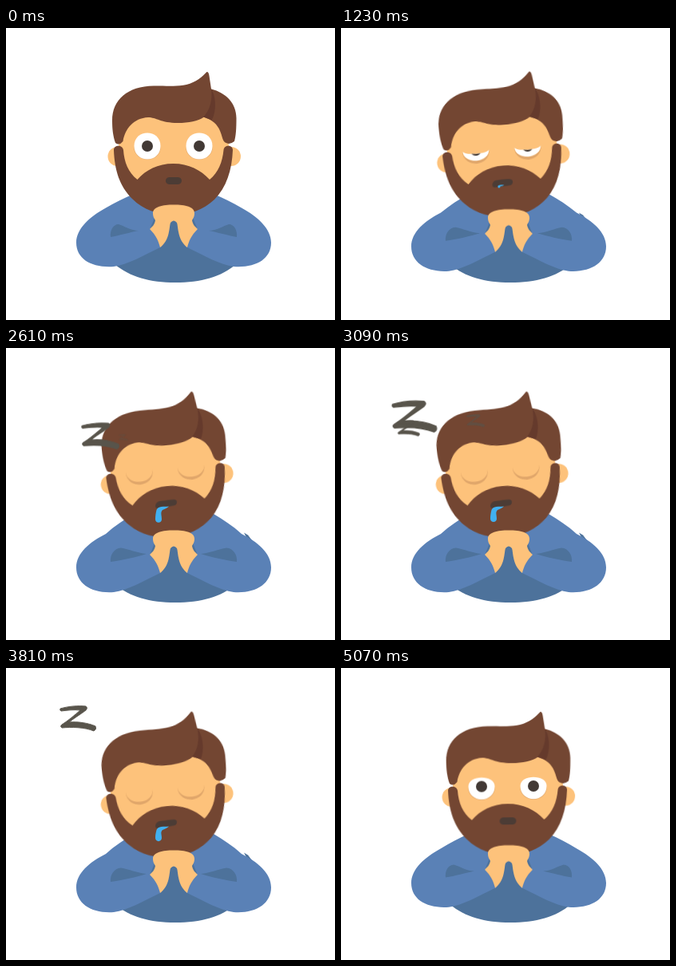
These frames come from a looping animation (412x366 px, 5.1 s). An HTML page:

```html
<!DOCTYPE html>
<html lang="en">
<head>
<meta charset="utf-8">
<title>Dozing off</title>
<style>
  html, body { margin: 0; width: 100%; height: 100%; overflow: hidden; background: #fff; }
  svg { display: block; width: 412px; height: 366px; }

  .skin { fill: #fdc27b; }
  .lash { fill: #e0a66a; }
  .hair { fill: #734632; }
  .lock { fill: #653a2c; }
  .sleeve { fill: #5a81b6; }
  .shirt { fill: #4d729b; }
  .pupil { fill: #423935; }
  .mouth { fill: #4c3c35; }
  .drool { fill: #41b0f0; }
  .z { fill: #58544b; stroke: #58544b; opacity: 0; }

  .move, .morph, .lid, .drool, .z { animation: 5.1s linear infinite; }
  .move { animation-name: move; }
  .morph { animation-name: morph; }
  .lid { animation-name: lid; }
  .drool { animation-name: drool; }

  .head { transform-origin: 211px 254px; --doze: translateY(2.6px) rotate(-5.6deg); }
  .hands { --doze: translateY(7px); }

  .arm {
    --awake: path("M160 208 C148 213 136 219 125 225.5 C104 237 88 252 88 269 C88 290 108 301 135 299 C152 297 172 285 195 274 L181 250 L190 228 L205 214Z");
    --asleep: path("M160 208 C148 215 136 223 125 233 C105 243 88 257 88 275 C88 296 108 308 135 306 C152 304 172 292 195 281 L181 257 L190 235 L205 214Z");
  }
  .fold {
    --awake: path("M131 262 C130 254 134 246 141 246 C148 248 156 254 166 254 C156 256 142 260 131 262Z");
    --asleep: path("M131 268 C130 260 135 251 144 250.5 C154 252 164 257 176 258 C164 262 145 266 131 268Z");
  }
  .mouth {
    --awake: path("M204.5 187 C210 187 210 187 215.5 187 C221.5 187 221.5 196 215.5 196 C210 196 210 196 204.5 196 C198.5 196 198.5 187 204.5 187Z");
    --asleep: path("M198 188 C205 187.5 212 187.3 217 187.5 C221.5 188 221 194 217 195 C210 196 202 195.5 196 196.5 C191 197 192.5 189 198 188Z");
  }

  @keyframes move {
    0%, 100% { transform: translateY(0) rotate(0deg); animation-timing-function: cubic-bezier(.39, .575, .565, 1); }
    42.35%, 85.3% { transform: var(--doze); animation-timing-function: cubic-bezier(.55, .055, .675, .19); }
  }
  @keyframes morph {
    0%, 100% { d: var(--awake); animation-timing-function: cubic-bezier(.39, .575, .565, 1); }
    42.35%, 85.3% { d: var(--asleep); animation-timing-function: cubic-bezier(.55, .055, .675, .19); }
  }

  /* Visible part of the eyeball: upper lid curve, then lower lid curve */
  @keyframes lid {
    0%, 100% { d: path("M-16.5 0 C-16.5 -22 16.5 -22 16.5 0 C16.5 22 -16.5 22 -16.5 0Z"); }
    15.3% { d: path("M-16.5 0 C-16.5 4 16.5 4 16.5 0 C16.5 18 -16.5 18 -16.5 0Z"); }
    33.5% { d: path("M-16.5 0 C-16.5 8.5 16.5 8.5 16.5 0 C16.5 17 -16.5 17 -16.5 0Z"); }
    42.35%, 85.3% {
      d: path("M-16.5 0 C-16.5 17.5 16.5 17.5 16.5 0 C16.5 17.5 -16.5 17.5 -16.5 0Z");
      animation-timing-function: cubic-bezier(.55, .085, .68, .53);
    }
    99.4% { d: path("M-16.5 0 C-16.5 -14.5 16.5 -14.5 16.5 0 C16.5 21.5 -16.5 21.5 -16.5 0Z"); }
  }

  @keyframes drool {
    0%, 22%, 94%, 100% {
      opacity: 0;
      d: path("M203 197 C201 197 199 197 198 197 C197 197 197 198 197 198 C197 199 199 199 199 198 C199 198 199 198 200 198 C201 198 202 198 203 197Z");
    }
    24%, 92% { opacity: 1; }
    33.5% {
      opacity: 1;
      d: path("M204 198.5 C198 198 191 198 189 203 C188 205 188 206 188 208 C188 213.5 195.5 213.5 195.5 208 C195.5 206 194 205 197 203 C199 202 202 201 204 198.5Z");
    }
    46% {
      opacity: 1;
      d: path("M204 198.5 C198 199 190 198 188.5 203 C187.5 207 187 211 187 215 C187 220.5 195 220.5 195 215 C195 210 193 206 196 203 C198 202 202 201 204 198.5Z");
    }
    74%, 85.3% {
      opacity: 1;
      d: path("M204 198.5 C198 199 190 198 188.5 203 C187.5 207 187 209 187 213 C187 218.5 195 218.5 195 213 C195 208 193 206 196 203 C198 202 202 201 204 198.5Z");
    }
  }

  .z1 { animation-name: z1; }
  .z2 { animation-name: z2; }
  .z3 { animation-name: z3; }
  @keyframes z1 {
    0%, 42.9% { transform: translate(152px, 116px) scale(.25); opacity: 0; }
    46% { opacity: 1; }
    51.2% { transform: translate(119px, 110px) scale(1.04); }
    52.9% { transform: translate(108px, 104px) scale(1.1); }
    60.6% { transform: translate(93px, 85.5px) scale(1.24); }
    63.5% { transform: translate(82px, 68px) scale(1.25); opacity: 1; }
    68%, 100% { transform: translate(80px, 45px) scale(1.2); opacity: 0; }
  }
  @keyframes z2 {
    0%, 49% { transform: translate(152px, 114px) scale(.2); opacity: 0; }
    51.2% { transform: translate(147px, 112px) scale(.25); opacity: .4; }
    55%, 64% { opacity: 1; }
    60.6% { transform: translate(85px, 100.5px) scale(.62); }
    70%, 100% { transform: translate(75px, 70px) scale(.7); opacity: 0; }
  }
  @keyframes z3 {
    0%, 58% { transform: translate(175px, 102px) scale(.3); opacity: 0; }
    60.6% { transform: translate(169px, 91px) scale(.5); opacity: .6; }
    63% { opacity: 1; }
    74.7% { transform: translate(91px, 63px) scale(1); }
    80% { opacity: 1; }
    84.4%, 100% { transform: translate(86px, 35px) scale(1); opacity: 0; }
  }
</style>
</head>
<body>
<svg viewBox="0 0 412 366">
  <defs>
    <clipPath id="lid"><path class="lid"/></clipPath>
    <g id="eye">
      <path class="lash" d="M-17 0 C-17 22.5 17 22.5 17 0Z"/>
      <path class="skin" d="M-17 -1 C-17 18 17 18 17 -1Z"/>
      <g clip-path="url(#lid)">
        <circle r="18" fill="#fff"/>
        <circle class="pupil" r="7"/>
      </g>
    </g>
    <path id="zee" transform="translate(-91 -63)" d="M68 51 C78 48 90 47 100 48 Q103 50 100 53 C92 59 85 63 79 68 C90 67 103 69 112 73 Q114 77 110 79 C98 74 82 74 70 75 Q67 73 70 71 C78 66 86 59 93 53 C85 52 77 53 69 54 Q67 53 68 51Z"/>
  </defs>

  <path class="shirt" d="M136 296 C155 312 180 319 212 319 C244 319 270 312 288 296 L245 225 L175 225Z"/>
  <path class="shirt" d="M298 231.500 L303 234.500 L308 241 L303 241Z"/>
  <g id="left">
    <path class="sleeve arm morph"/>
    <path class="shirt fold morph"/>
  </g>
  <g id="right" transform="translate(420) scale(-1 1)"></g>

  <g class="head move">
    <circle class="skin" cx="139.5" cy="161" r="12"/>
    <circle class="skin" cx="282" cy="161" r="12"/>
    <path class="skin" d="M141 150 C141 118 160 100 210 100 C260 100 279 118 279 150 C277 200 250 226 210 226 C170 226 143 200 141 150Z"/>
    <path class="hair" d="M135 153 C135 146 146 146 147 153 C148 168 153 181 164.500 190 C175 178 190 170 209.500 170 C229 170 244 178 255 190 C266 181 271 168 272.500 153 C273 146 284 146 284 153 C283 178 276 200 261 215 C247 228 230 234 210 234 C190 234 172 228 158 214 C142 198 136 178 135 153Z"/>
    <use href="#eye" x="177" y="148"/>
    <use href="#eye" x="242" y="148"/>
    <path class="hair" d="M137 144 C134 135 133 127 133 116 C133 90 152 73 185 72.500 C203 72 214 74 226 71 C238 68 246 61 251 55.500 C253 54 254 57 254.500 60 L257 76.500 C275 81 288.500 94 288.500 113 C288.500 126 288 135 286 142 Q280 147 274.500 143.500 C271 141 271 136 268 129 C265 121 258 115 248 111.500 C240 117 229 119 215 119 C194 119 188 112 178 112 C160 113 149 126 146.500 142 Q142 148 137 144Z"/>
    <path class="lock" d="M257 76.500 C263 85 264 105 257.500 115.500 L247 111.500 C255 104 259 90 257 76.500Z"/>
    <path class="mouth morph"/>
    <!-- drawn in resting-pose coordinates -->
    <g transform="rotate(5.6 211 254) translate(0 -2.6)"><path class="drool"/></g>
  </g>

  <path class="skin hands move" d="M184 232 C184 224 196 221.500 210 221.500 C225 221.500 236 224 236 232 C236 237 234 239 233 241 C234 247 237 249 240 252 C232 260 229 267 227 275 C222 271 218 265 216.500 258 C215 252 215 247 214 244 Q210 239 206 244 C205 247 205 252 203.500 258 C202 265 198 271 193 275 C191 267 188 260 180 252 C183 249 186 247 187 241 C186 239 184 237 184 232Z"/>

  <g class="z z1"><use href="#zee"/></g>
  <g class="z z2"><use href="#zee"/></g>
  <g class="z z3"><use href="#zee"/></g>
</svg>
<script>
  // The right arm mirrors the left one
  document.getElementById('right').innerHTML = document.getElementById('left').innerHTML;
</script>
</body>
</html>
```
